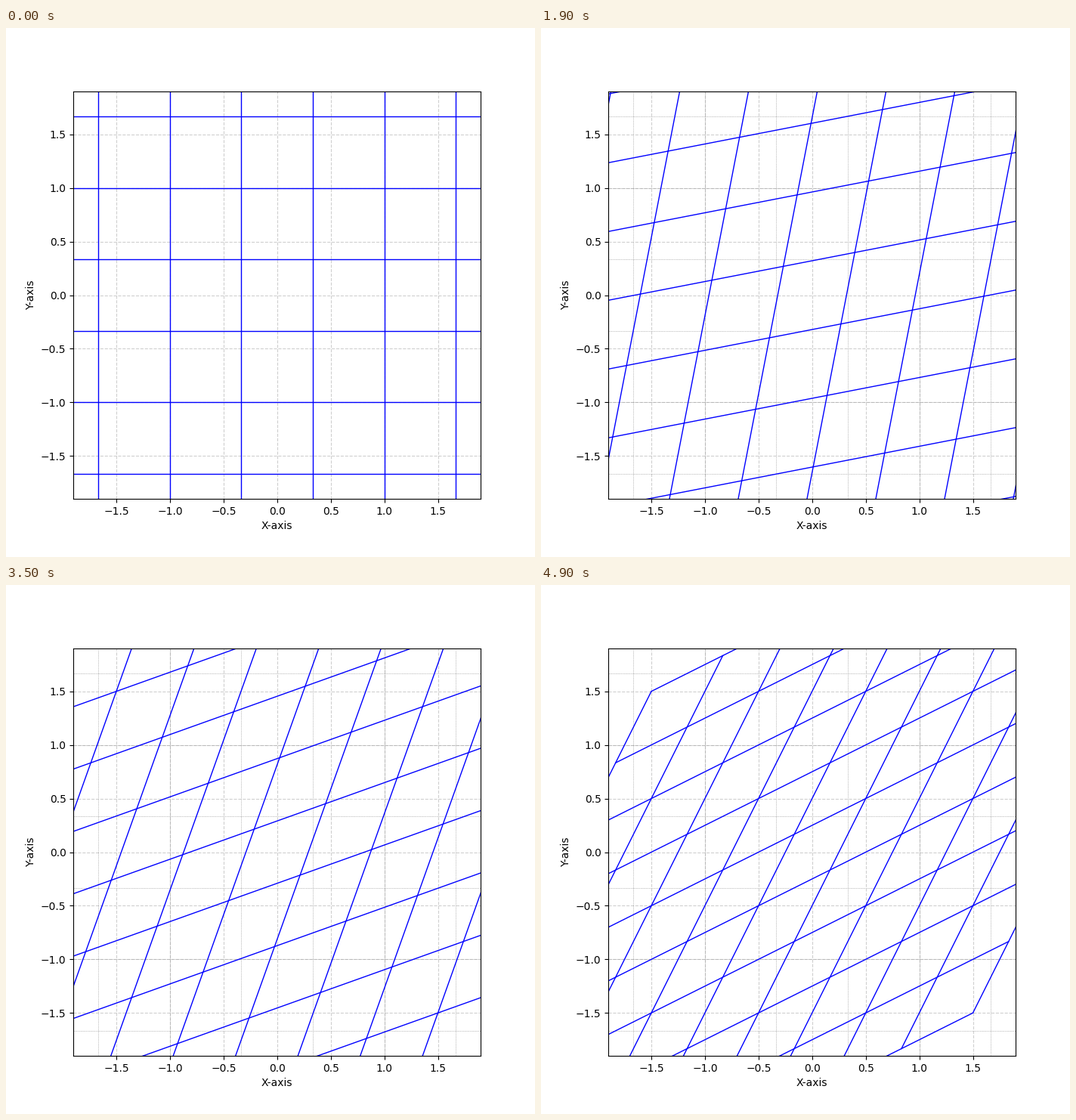
A matplotlib script for the animation above (5 s loop, 700 by 700 pixels).

```python
import numpy as np
import matplotlib.pyplot as plt
from matplotlib.animation import FuncAnimation

FRAMES = 50
INTERVAL = 100
MAX_SHEAR = 0.5
EXTENT = 3
LIMIT = 1.9

fig, ax = plt.subplots(figsize=(7, 7), dpi=100)
ax.set_aspect("equal")
ax.set_xlim(-LIMIT, LIMIT)
ax.set_ylim(-LIMIT, LIMIT)
ax.set_xlabel("X-axis")
ax.set_ylabel("Y-axis")
ax.grid(True, linestyle="--", alpha=0.6)


def grid_segments():
    """End points of the grid lines, each a 2x2 array with rows x and y."""
    span = np.array([-EXTENT, EXTENT])
    for c in np.linspace(-EXTENT, EXTENT, 10):
        level = np.full(2, c)
        yield np.array([span, level])
        yield np.array([level, span])


segments = list(grid_segments())
for x, y in segments:
    ax.plot(x, y, color="gray", linestyle=":", linewidth=0.5)
lines = [ax.plot([], [], color="blue", linewidth=1)[0] for _ in segments]


def update(frame):
    shear = MAX_SHEAR * frame / (FRAMES - 1)
    matrix = np.array([[1, shear], [shear, 1]])
    for line, segment in zip(lines, segments):
        line.set_data(*(matrix @ segment))
    return lines


anim = FuncAnimation(fig, update, frames=FRAMES, interval=INTERVAL, repeat=True)
plt.show()
```
